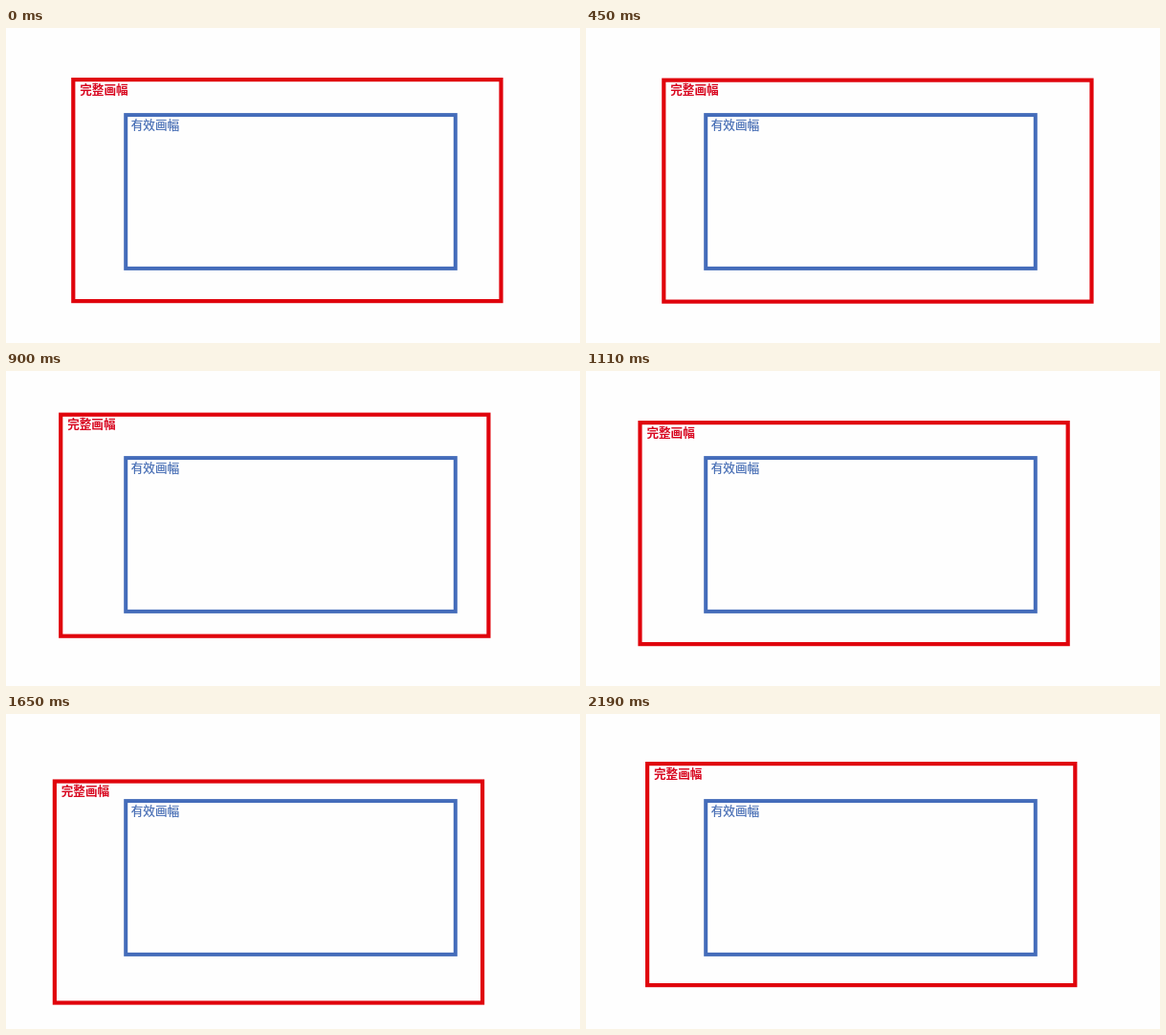
Write an HTML page that moves like this. It is 600x330 px and loops after 2220 ms.

```html
<!DOCTYPE html>
<html lang="zh-CN">
<head>
<meta charset="utf-8">
<title>画幅</title>
<style>
  html, body { margin: 0; height: 100%; overflow: hidden; background: #fefefe; }
  svg { display: block; width: 600px; height: 330px; }
  rect { fill: none; }
  text { font: 12.6px "Noto Sans CJK SC", "Noto Sans CJK", sans-serif; }
  #full text { font-weight: 700; }
</style>
</head>
<body>
<svg viewBox="0 0 600 330">
  <rect x="125.2" y="91.1" width="344.6" height="160.8" stroke="#446cba" stroke-width="4"/>
  <text x="130.7" y="105.8" fill="#4169b2" stroke="#4169b2" stroke-width=".2">有效画幅</text>
  <g id="full">
    <rect x="2.1" y="2.1" width="447.2" height="232" stroke="#e0040c" stroke-width="4.2"/>
    <text x="9" y="16.9" fill="#d8061f">完整画幅</text>
  </g>
</svg>
<script>
const LOOP = 2220, STEP = 30;

// Smooth curve through [time, value] keys, level at both ends and at each turn
function curve(...keys) {
  const slope = i => (keys[i + 1][1] - keys[i][1]) / (keys[i + 1][0] - keys[i][0]);
  const last = keys.length - 1;
  const tangent = keys.map((_, i) => {
    if (i === 0 || i === last) return 0;
    const a = slope(i - 1), b = slope(i);
    return a * b > 0 ? 2 * a * b / (a + b) : 0;
  });
  return t => {
    let i = 0;
    while (i < last - 1 && t >= keys[i + 1][0]) i++;
    const [t0, p0] = keys[i], [t1, p1] = keys[i + 1];
    const d = t1 - t0, u = (t - t0) / d, v = 1 - u;
    return v * v * ((1 + 2 * u) * p0 + u * d * tangent[i])
         + u * u * ((1 + 2 * v) * p1 - v * d * tangent[i + 1]);
  };
}

// The red frame drifts like a shaken camera
const x = curve([0, 68.2], [680, 83.2], [995, 47.3], [1450, 91.8], [1690, 45.3], [2190, 62]);
const y = curve([0, 52], [200, 62.8], [630, 40.3], [725, 33.4], [900, 43.6],
                [1320, 61], [1500, 74.8], [1960, 49.3], [2190, 50]);

const full = document.getElementById("full");
const start = performance.now();

function draw() {
  const t = Math.floor((performance.now() - start) % LOOP / STEP) * STEP;
  full.setAttribute("transform", `translate(${x(t)} ${y(t)})`);
  requestAnimationFrame(draw);
}
draw();
</script>
</body>
</html>
```
